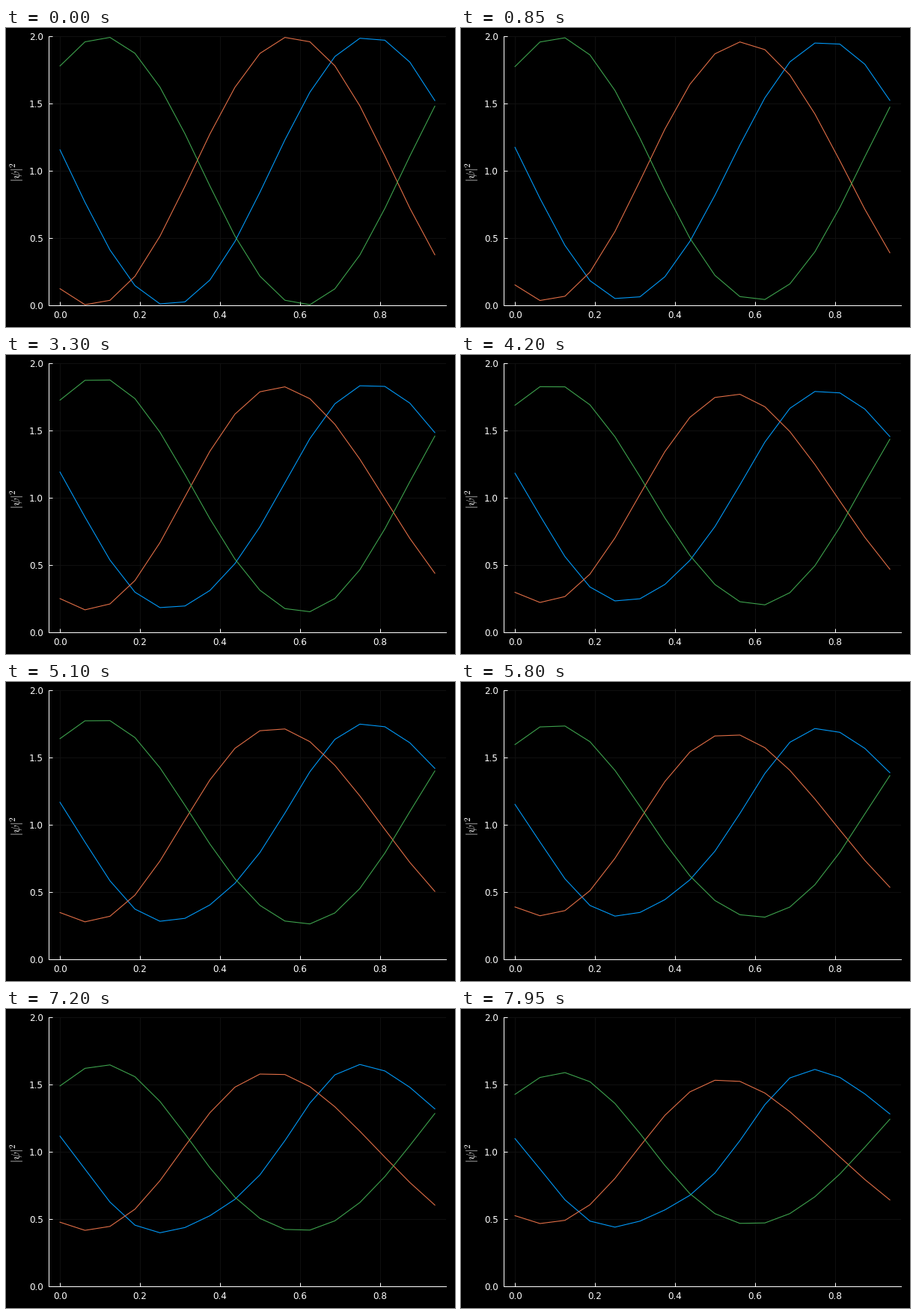
A matplotlib script that plays this animation: 600x400 px, repeating every 8000 ms.

```python
import numpy as np
import matplotlib.pyplot as plt
from matplotlib.animation import FuncAnimation

W, H, DPI = 600, 400, 100
FRAMES, STEP = 160, 50
PX = 72 / DPI  # one pixel in points

plt.rcParams.update({
    "font.family": "DejaVu Sans",
    "mathtext.fontset": "cm",
})

x = np.arange(16) / 16


def wave(u, k, start, end, power, phase, drift=0, bend=0):
    """Harmonic k: its height eases from start to end while its phase moves."""
    height = start + (end - start) * u ** power
    angle = phase + drift * u + bend * np.sin(np.pi * u)
    return height * np.cos(2 * np.pi * k * x - angle)


# The main wave decays while small overtones grow.
def blue(u):
    return (1 + wave(u, 1, 1, .578, 1.1, -1.412, bend=.07)
            + wave(u, 2, 0, .028, .8, -1.9, drift=-1.2)
            + wave(u, 3, 0, .04, 1, .4))


def orange(u):
    return (1 + wave(u, 1, -1, -.53, 1.15, .506, drift=-.188, bend=-.046)
            + wave(u, 2, 0, .046, .4, -.85))


def green(u):
    return (1 + wave(u, 1, 1, .563, 1.4, .674, drift=-.01, bend=-.045)
            + wave(u, 2, 0, .035, .3, 2, bend=-1.4))


fig = plt.figure(figsize=(W / DPI, H / DPI), dpi=DPI, facecolor="black")
left, right, top, bottom = 57.1, 588.1, 11.45, 371.3
ax = fig.add_axes([left / W, 1 - bottom / H, (right - left) / W, (bottom - top) / H],
                  facecolor="black")
pad = 0.03 * x[-1]
ax.set_xlim(-pad, x[-1] + pad)
ax.set_ylim(0, 2)
ax.set_xticks(np.arange(5) * .2)
ax.set_yticks(np.arange(5) * .5)
ax.xaxis.set_major_formatter("{x:.1f}")
ax.yaxis.set_major_formatter("{x:.1f}")
ax.tick_params(direction="in", length=5 * PX, width=PX, color="white",
               labelcolor="white", labelsize=12 * PX)
ax.tick_params(axis="x", pad=6.5 * PX)
ax.tick_params(axis="y", pad=7.5 * PX)
ax.set_axisbelow(True)
ax.grid(color="#0f0f0f", linewidth=PX)
for side in ("top", "right"):
    ax.spines[side].set_visible(False)
for side in ("left", "bottom"):
    ax.spines[side].set(color="white", linewidth=PX)

fig.text(20 / W, 1 - 193 / H, r"$|\psi|^2$", color="white", fontsize=16 * PX,
         rotation=90, rotation_mode="anchor", ha="center", va="baseline")

curves = [(ax.plot(x, rule(0), color=color, linewidth=1.1 * PX)[0], rule)
          for rule, color in ((blue, "#009afa"), (orange, "#e36f47"), (green, "#3ea44e"))]


def draw(i):
    u = i / (FRAMES - 1)
    for line, rule in curves:
        line.set_ydata(rule(u))
    return [line for line, _ in curves]


anim = FuncAnimation(fig, draw, frames=FRAMES, interval=STEP, repeat=True, repeat_delay=0)
plt.show()
```
